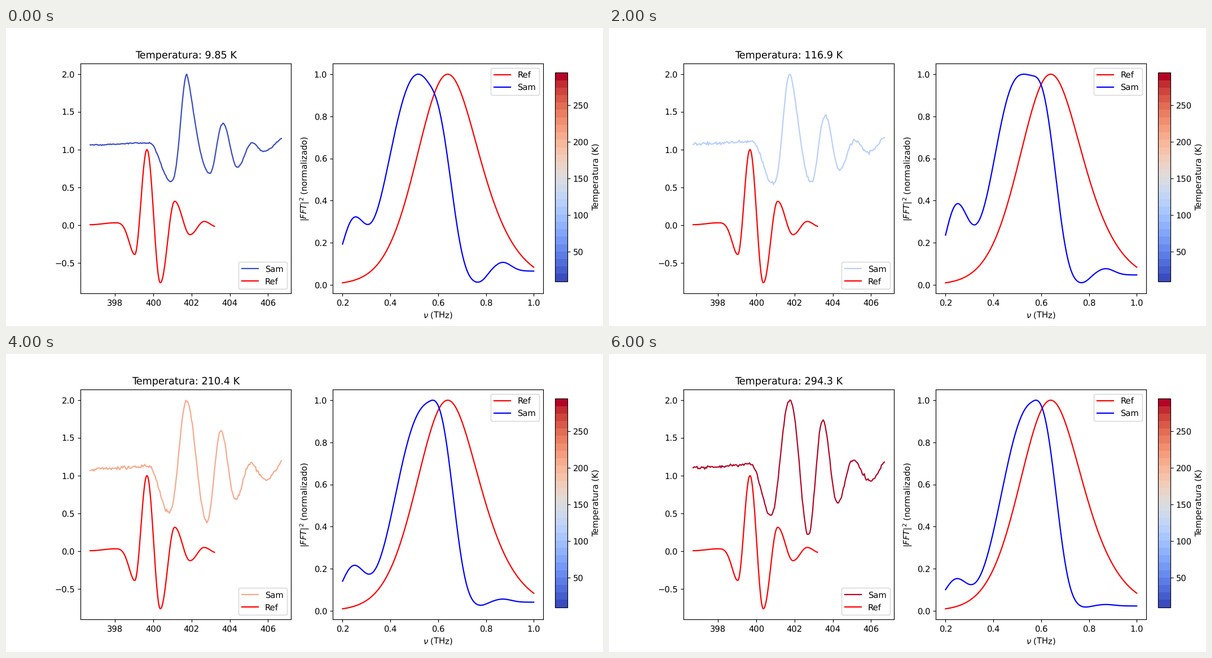
A matplotlib script for the animation above (6.5 s loop, 1058 by 529 pixels).

```python
import numpy as np
import matplotlib.pyplot as plt
from matplotlib.animation import FuncAnimation
from matplotlib.cm import ScalarMappable
from matplotlib.colors import Normalize

plt.rcParams["font.family"] = "DejaVu Sans"
plt.rcParams["text.hinting"] = "none"

TEMPS = [9.85, 18.1, 62.4, 90.6, 116.9, 142.0, 165.8,
         188.3, 210.4, 231.9, 252.9, 273.8, 294.3]

# Turning points of the pulses: time (ps), level, skew of the swing that follows
REF_TURNS = np.array([
    (396.7, .005, 1), (398.0, .03, 1.7), (399.03, -.39, 1), (399.67, 1, 1),
    (400.37, -.765, 1), (401.12, .315, 1), (401.92, -.127, 1),
    (402.66, .048, 1), (403.3, -.02, 1)])
COLD_TURNS = np.array([
    (396.7, 1.065, 1), (399.8, 1.09, 1), (400.93, .58, 1.25), (401.75, 2, .7),
    (402.96, .69, 1), (403.64, 1.35, 1), (404.39, .77, 1), (405.17, 1.09, 1),
    (405.77, .98, 1), (407.0, 1.18, 1)])
HOT_TURNS = np.array([
    (396.7, 1.1, 1), (399.75, 1.14, 1), (400.77, .465, 1), (401.74, 2, 1.1),
    (402.72, .21, 1), (403.47, 1.73, 1), (404.25, .63, 1), (405.03, 1.2, 1),
    (405.98, .925, 1), (407.0, 1.26, 1)])

# How the sample changes along the warm-up (0 = coldest, 1 = warmest)
STAGES = [0, .03, .28, .6, 1]
TRENDS = {
    "noise": [.004, .011, .011, .011, .011],
    "tilt": [1.7, 2.25, 1, -.5, -.8],
    "width": [.185, .193, .193, .182, .17],
    "ripple": [0, .035, .035, .01, 0],
    "low_bump": [.273, .37, .386, .2, .133],
    "high_bump": [.105, .084, .085, .045, .018],
    "floor": [0, -.008, -.008, .02, .012],
}


def trend(name, warmth):
    return np.interp(warmth, STAGES, TRENDS[name])


def gauss(x, center, width):
    return np.exp(-((x - center) / width) ** 2)


def swing(turns, at):
    """Cosine easing from one turning point to the next."""
    t, level, skew = turns.T
    i = np.clip(np.searchsorted(t, at, "right") - 1, 0, len(t) - 2)
    u = np.clip((at - t[i]) / (t[i + 1] - t[i]), 0, 1) ** skew[i]
    return level[i] + (level[i + 1] - level[i]) * (1 - np.cos(np.pi * u)) / 2


def sample_pulse(step):
    warmth = norm(TEMPS[step])
    turns = COLD_TURNS + (HOT_TURNS - COLD_TURNS) * warmth ** 1.3
    noise = np.random.default_rng(step).normal(0, 1, len(time))
    y = swing(turns, time) + trend("noise", warmth) * noise
    return 2 * y / y.max()


def reference_spectrum():
    """Gaussian core with a heavier tail on the high-frequency side."""
    d = freq - .64
    tail = np.where(d < 0, .36, .18)
    return np.exp(-62 * tail ** 2 * (np.sqrt(1 + (d / tail) ** 2) - 1))


def sample_spectrum(step):
    warmth = norm(TEMPS[step])
    d = freq - .56
    left_side = (np.abs(d) / trend("width", warmth)) ** 2.4
    right_side = (np.abs(d) / .118) ** 2.8
    y = np.exp(-np.where(d < 0, left_side, right_side)
               - trend("tilt", warmth) * (freq - .55))
    y /= y.max()

    ripple = np.cos(2 * np.pi * (freq - .45) / .2) * gauss(freq, .5, .18)
    shelf = .62 / (1 + np.exp(-(freq - .8) / .015))
    y += trend("ripple", warmth) * ripple
    y += trend("low_bump", warmth) * gauss(freq, .243, .067)
    y += trend("high_bump", warmth) * (shelf + .4 * gauss(freq, .87, .05))
    y = np.maximum(y + trend("floor", warmth), 0)
    return y / y.max()


norm = Normalize(TEMPS[0], TEMPS[-1])
cmap = plt.get_cmap("coolwarm")
time = np.linspace(396.7, 406.7, 201)
ref_time = np.linspace(396.7, 403.2, 300)
freq = np.linspace(.2, 1, 400)
ref_spectrum = reference_spectrum()

fig, (left, right) = plt.subplots(1, 2, figsize=(10, 5), dpi=105.8)

sam_line, = left.plot(time, sample_pulse(0), label="Sam")
left.plot(ref_time, swing(REF_TURNS, ref_time), "r", label="Ref")
left.set(xlim=(396.2, 407.2), ylim=(-.9033, 2.1383))
left_legend = left.legend(loc="lower right")
title = left.set_title("")

right.plot(freq, ref_spectrum, "r", label="Ref")
fft_line, = right.plot(freq, ref_spectrum, "b", label="Sam")
right.set(xlim=(.16, 1.04), xlabel=r"$\nu$ (THz)",
          ylabel=r"$|FFT|^2$ (normalizado)")
right.legend(loc="upper right")

bar_axes = fig.add_axes([.92, .15, .02, .7])
fig.colorbar(ScalarMappable(norm, cmap.resampled(28)), cax=bar_axes,
             label="Temperatura (K)")


def update(step):
    color = cmap(norm(TEMPS[step]))
    sam_line.set_ydata(sample_pulse(step))
    sam_line.set_color(color)
    left_legend.legend_handles[0].set_color(color)
    title.set_text(f"Temperatura: {TEMPS[step]} K")

    y = sample_spectrum(step)
    fft_line.set_ydata(y)
    low = min(y.min(), ref_spectrum.min())
    margin = .05 * (1 - low)
    right.set_ylim(low - margin, 1 + margin)
    return sam_line, fft_line, title


animation = FuncAnimation(fig, update, frames=len(TEMPS), interval=500,
                          repeat=True, repeat_delay=0)
plt.show()
```
